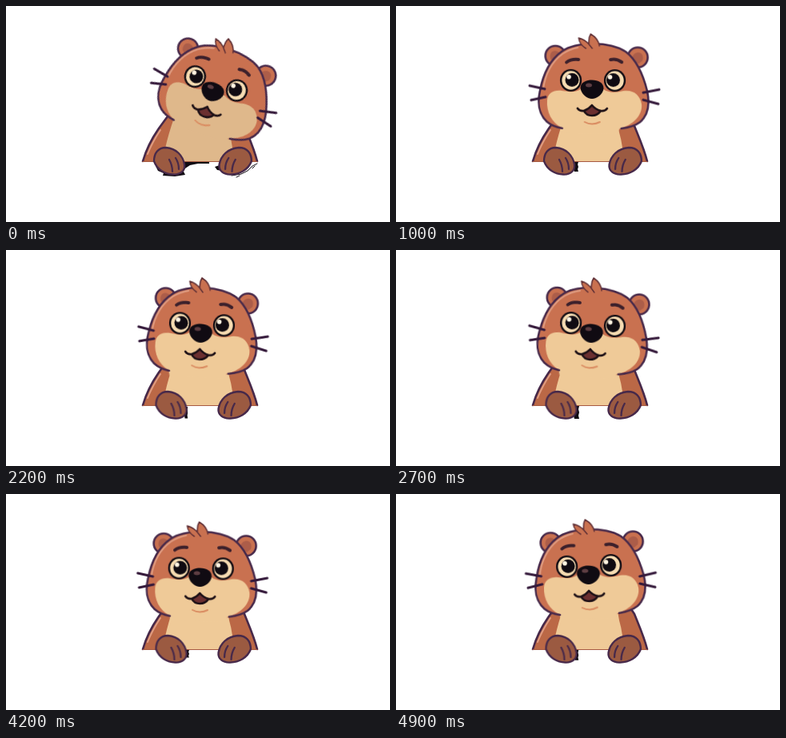
Write an HTML page that moves like this. It is 480 px wide and 270 px high and loops after 5000 ms.

```html
<!DOCTYPE html>
<html lang="en">
<head>
<meta charset="utf-8">
<title>Otter</title>
<style>
  html, body { margin: 0; width: 100%; height: 100%; overflow: hidden; background: #fff; }
  svg { display: block; width: 100vw; height: 100vh; }

  path { stroke-linecap: round; stroke-linejoin: round; }
  .ink { fill: none; stroke: #47294a; stroke-width: 2.6; }
  .line { fill: none; stroke: #1d1016; stroke-width: 2.7; }
  .brow { fill: none; stroke: #3c202b; stroke-width: 4; }
  .whisker { fill: none; stroke: #34193a; stroke-width: 3; }
  .finger { fill: none; stroke: #47294a; stroke-width: 2.2; }
  .shine { fill: none; stroke: #df9c82; stroke-width: 2; }
  .fur { fill: #c97150; }
  .body { fill: #bb6846; }
  .cream { fill: #efca98; }
  .dark { fill: #100b12; }
  .paw { fill: #9b5a41; stroke: #47294a; stroke-width: 2.3; }
  .tuft { fill: #c97150; stroke: #5f2f35; stroke-width: 1.5; }

  .head, .skull, .cream, .left, .right, .gap, .scraps { animation: 5s infinite; }
  .head { animation-name: sway; }
  .skull { animation-name: turn; animation-timing-function: steps(6); }
  .cream { animation-name: warm; animation-timing-function: steps(6); }
  .left { animation-name: left; animation-timing-function: steps(7); }
  .right { animation-name: right; animation-timing-function: steps(7); }
  .gap { animation-name: gap; animation-timing-function: step-end; }
  .scraps { animation-name: scraps; animation-timing-function: step-end; }

  @keyframes sway {
    0% { transform: translate(258px, 107px) rotate(18.5deg); animation-timing-function: steps(6); }
    12% { transform: translate(248px, 105px) rotate(5deg); animation-timing-function: steps(4); }
    20% { transform: translate(245px, 104px) rotate(.3deg); animation-timing-function: steps(7); }
    34% { transform: translate(242.5px, 103.7px) rotate(2deg); animation-timing-function: steps(10); }
    54% { transform: translate(244.3px, 104px) rotate(4deg); animation-timing-function: steps(8); }
    70% { transform: translate(244.3px, 104px) rotate(4deg); animation-timing-function: steps(7); }
    84% { transform: translate(242.6px, 104px) rotate(.8deg); animation-timing-function: steps(7); }
    98%, 100% { transform: translate(240.5px, 101px) rotate(-1.8deg); }
  }
  @keyframes turn {
    0% { transform: translate(2.5px, 0); }
    12%, 100% { transform: translate(0, 0); }
  }
  @keyframes warm {
    0% { fill: #dfb88b; }
    12%, 100% { fill: #efca98; }
  }
  @keyframes left {
    0%, 20% { transform: translate(0, 0); }
    34%, 100% { transform: translate(2.5px, 0); }
  }
  @keyframes right {
    0%, 20% { transform: translate(0, 0); }
    34%, 100% { transform: translate(-1px, 0); }
  }
  @keyframes gap {
    0% { transform: translate(222px, 195px) scale(1, .2); }
    12% { transform: translate(222px, 195px) scale(.85, .75); }
    34% { transform: translate(223px, 196px) scale(.6, .9); }
    48% { transform: translate(222px, 195px) scale(1, 1); }
    66% { transform: translate(222px, 197px) scale(.85, .88); }
    80% { transform: translate(223px, 195px) scale(.85, .6); }
    94%, 100% { transform: translate(223px, 195px) scale(.75, .8); }
  }
  @keyframes scraps {
    0% { opacity: 1; }
    10%, 100% { opacity: 0; }
  }
</style>
</head>
<body>
<svg viewBox="0 0 480 270" xmlns="http://www.w3.org/2000/svg" xmlns:xlink="http://www.w3.org/1999/xlink">
  <defs>
    <g id="paw">
      <path class="paw" d="M185 194C185 184 190 177 200 177C213 178 221 187 223 198C224 206 218 211 209 210.500C199 210 189 205 185 194Z"/>
      <path class="finger" d="M204 192Q208 199 208 207M212 190Q216 196 216 204"/>
    </g>
    <g id="ear">
      <circle class="fur" r="12.500"/>
      <circle class="ink" r="12.500"/>
      <path d="M-6 4C-8 -3 -4 -7 1 -6C5 -5 7 -2 7 2L-1 8Z" fill="#ac5d49"/>
    </g>
    <g id="eye">
      <ellipse class="dark" rx="13.600" ry="14"/>
      <ellipse rx="11.200" ry="11.800" fill="#f6dcb2"/>
    </g>
    <g id="pupil">
      <circle class="dark" r="8.500"/>
      <circle cx="-4" cy="-3.800" r="2.800" fill="#fff4e2"/>
    </g>
  </defs>

  <!-- body -->
  <path class="body" d="M171 194C175 180 182 166 191 153L202 138H290L298 150C304 165 310 178 314 194Z"/>
  <path class="cream" d="M210 140Q203 160 199 178L196 194H284Q284 175 279 158L276 140Z"/>
  <path class="ink" d="M171 194C175 180 182 166 191 153L202 138M290 138L298 150C304 165 310 178 314 194"/>
  <path class="shine" d="M177 185Q183 170 193 155"/>
  <path d="M171 194.500H314" stroke="#a75a42"/>

  <!-- dark slivers around the paws -->
  <path class="dark gap" d="M0 0H7L6 4L7 8L6 12L7 16H1L0 12Z"/>
  <g class="scraps">
    <path class="dark" d="M187 200L194 199L199 207H222L224 211L211 213L196 212L197 209L190 206ZM219 195H254V197H240L230 199L224 203L222 207ZM261 201L267 199L271 206L264 205Z"/>
    <path d="M282 212L294 210L302 206L308 200L314 197M308 203L311 200M288 214L292 212" fill="none" stroke="#100b12"/>
  </g>

  <g class="left"><use xlink:href="#paw"/></g>
  <g class="right"><use xlink:href="#paw" transform="matrix(-1.06 0 0 1 503 0)"/></g>

  <!-- head, drawn around the nose -->
  <g class="head">
    <use xlink:href="#ear" transform="translate(-46 -41.500)"/>
    <use xlink:href="#ear" transform="translate(57 -40) scale(-1 1)"/>

    <g class="skull">
      <path class="fur" d="M-38 -47C-20 -60 22 -60 42 -47C58 -35 65 -14 69 2C72 16 72 31 60 41C48 50 20 53 0 53C-20 53 -46 50 -56 41C-68 30 -68 16 -65 2C-62 -14 -56 -34 -38 -47Z"/>
      <path class="cream" d="M-56 14C-55 5 -48 1 -38 2C-28 3 -22 5 -14 0L14 0C22 5 29 4 39 2C52 0 60 7 62 18C64 32 51 45 35 49L31 55H-36L-38 48C-50 42 -57 29 -56 14Z"/>
      <path class="ink" d="M-37 49Q-49 47 -56 41C-68 30 -68 16 -65 2C-62 -14 -56 -34 -38 -47C-20 -60 22 -60 42 -47C58 -35 65 -14 69 2C72 16 72 31 60 41Q52 47 37 49"/>
      <path class="shine" d="M-61 0C-59 -14 -53 -32 -37 -44Q-28 -50 -18 -52"/>
      <path class="fur" d="M-15 -54L10 -55V-50H-12Z"/>
    </g>
    <path class="tuft" d="M-8 -51Q-16 -56 -17 -64Q-9 -62 -4 -56Q-5 -64 -2 -69Q8 -63 9 -54M-4 -56L0 -51"/>

    <path class="brow" d="M-32 -33.500Q-26 -38 -17 -37M23 -37Q30 -39 37 -34"/>

    <use xlink:href="#eye" x="-26.500" y="-11"/>
    <use xlink:href="#eye" x="28.500" y="-11"/>
    <use xlink:href="#pupil" x="-25" y="-11.500"/>
    <use xlink:href="#pupil" x="26.500" y="-11.500"/>

    <path class="dark" d="M-14.500 -2C-14 -9 -7 -11.500 0 -11.500C8 -11.500 14.500 -8 14.500 -1C14 6 6 12 0 12C-6 12 -14 6 -14.500 -2Z"/>
    <ellipse cx="-4" cy="-5" rx="4" ry="2.500" fill="#5d3d42"/>

    <path d="M-10 27Q-4 26 0 20Q4 26 11 27Q7 33 0 33Q-7 33 -10 27Z" fill="#6b2f30"/>
    <path class="line" d="M-18 24Q-15 28 -10 27Q-4 25 0 20Q4 25 11 27Q16 28 19 24M-10 27Q-7 33 0 33Q7 33 11 27"/>
    <path d="M-9 41Q0 46 10 41" fill="none" stroke="#da8d62" stroke-width="2"/>

    <path class="whisker" d="M-78 -4L-59 0M-76 14L-58 10M64 4L84 0M64 13L83 18"/>
  </g>
</svg>
</body>
</html>
```
